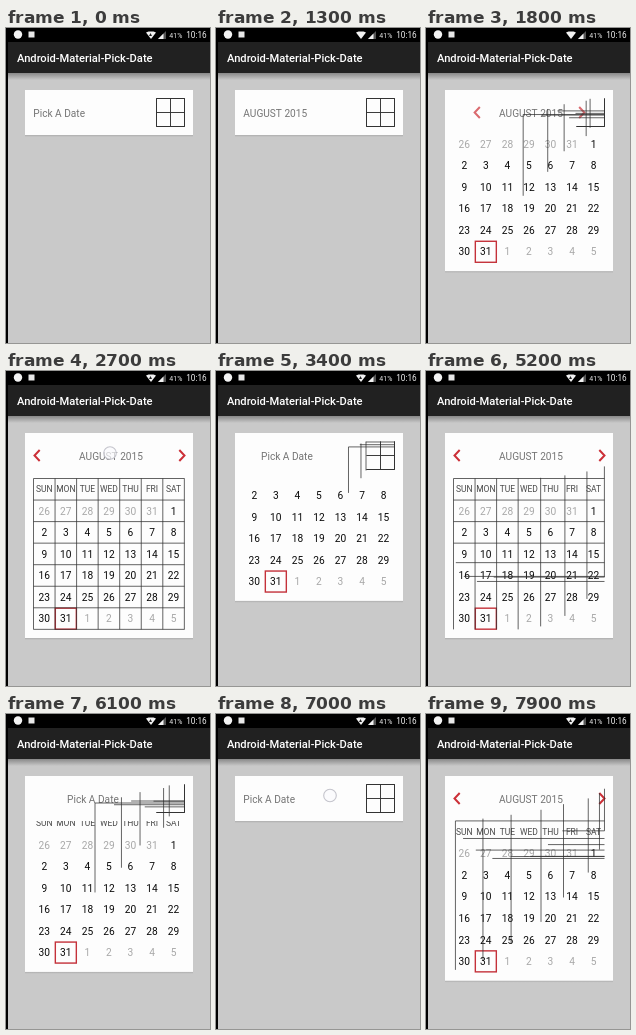
An HTML page with a canvas for the animation above (8000 ms loop, 204 by 315 pixels).

```html
<!DOCTYPE html>
<html lang="en">
<head>
<meta charset="utf-8">
<title>Date picker</title>
<style>
html, body { margin: 0; width: 100%; height: 100%; overflow: hidden; background: #c9c9c9; }
canvas { display: block; width: 204px; height: 315px; }
</style>
</head>
<body>
<canvas id="stage"></canvas>
<script>
const canvas = document.getElementById('stage');
const ctx = canvas.getContext('2d');
const dpr = window.devicePixelRatio || 1;
canvas.width = 204 * dpr;
canvas.height = 315 * dpr;

const LOOP = 8000;
const CARD = { x: 19, y: 62, w: 168, closed: 107, open: 267 };
const GRID = { x: 27.5, y: 107.5, cell: 21.55, right: 178.5, bottom: 258.4 };
const ICON_X = [150.5, 164.5, 178.5];
const ICON_Y = [70.5, 84.5, 98.5];
const START = [0, 0, 0, 1, 1, 2, 2, 2];
const LINE_MS = 400;
const WEEKDAYS = ['SUN', 'MON', 'TUE', 'WED', 'THU', 'FRI', 'SAT'];

// at: title swaps; base: first grid line starts moving
const PHASES = [
  { at: 0, open: false, base: -5000 },
  { at: 1100, open: true, base: 1618 },
  { at: 2720, open: false, base: 2821 },
  { at: 4200, open: true, base: 4676 },
  { at: 5520, open: false, base: 5621 },
  { at: 7100, open: true, base: 7533 }
];
const TOUCHES = [
  { from: 1000, to: 1300, x: 103, y: 84 },
  { from: 2700, to: 2950, x: 104, y: 82 },
  { from: 4000, to: 4390, x: 104, y: 80 },
  { from: 5500, to: 5750, x: 108, y: 81 },
  { from: 7000, to: 7250, x: 114, y: 81.5 }
];

const clamp = v => Math.min(1, Math.max(0, v));
const lerp = (a, b, p) => a + (b - a) * p;
const smooth = v => 0.5 - 0.5 * Math.cos(Math.PI * clamp(v));

// cubic-bezier(.4, 0, .2, 1)
function swift(v) {
  v = clamp(v);
  let lo = 0, hi = 1;
  for (let i = 0; i < 20; i++) {
    const s = (lo + hi) / 2, r = 1 - s;
    if (1.2 * r * r * s + 0.6 * r * s * s + s * s * s < v) lo = s; else hi = s;
  }
  return lo * lo * (3 - 2 * lo);
}

function rect(x, y, w, h, fill) {
  ctx.fillStyle = fill;
  ctx.fillRect(x, y, w, h);
}

function poly(points, fill) {
  ctx.beginPath();
  points.forEach(([x, y]) => ctx.lineTo(x, y));
  ctx.closePath();
  ctx.fillStyle = fill;
  ctx.fill();
}

function text(str, x, y, size, color, align = 'left', weight = 400) {
  ctx.font = `${weight} ${size}px Roboto, sans-serif`;
  ctx.textAlign = align;
  ctx.fillStyle = color;
  ctx.fillText(str, x, y);
}

function fade(y, h, from, to) {
  const g = ctx.createLinearGradient(0, y, 0, y + h);
  g.addColorStop(0, from);
  g.addColorStop(1, to);
  return g;
}

function stateAt(t) {
  const { open, base } = PHASES.filter(p => p.at <= t).pop();
  const dt = t - base;
  if (open) {
    return {
      title: 'AUGUST 2015',
      card: swift((dt + 102) / 500),
      slide: smooth((dt + 300) / 400),
      arrow: smooth((dt - 70) / 250),
      grid: i => smooth(dt / LINE_MS - 0.1 * i)
    };
  }
  return {
    title: 'Pick A Date',
    card: 1 - smooth((dt - 388) / 600),
    slide: 1 - smooth((dt - 279) / 500),
    arrow: 1 - smooth((dt + 100) / 250),
    grid: i => 1 - smooth(dt / LINE_MS - 0.1 * (7 - i))
  };
}

function drawBars(t) {
  rect(0, 0, 204, 315, '#c9c9c9');
  rect(0, 45, 204, 7, fade(45, 7, 'rgba(0,0,0,.32)', 'rgba(0,0,0,0)'));
  rect(0, 14, 204, 31, '#212121');
  rect(0, 0, 204, 14, '#000');
  rect(0, 0, 2, 315, '#000');

  ctx.beginPath();
  ctx.arc(12, 6.5, 4.2, 0, 7);
  ctx.fillStyle = '#f4f4f4';
  ctx.fill();
  rect(22.5, 3.5, 6, 6, '#e8e8e8');

  poly([[140, 4.6], [142.5, 3.4], [147.5, 3.4], [150, 4.6], [145, 11]], '#f2f2f2');
  const transfer = t < 400 || t >= 2300;
  if (transfer) poly([[143, 8], [146, 8], [144.5, 5]], '#222');
  poly([[152, 11], [160, 11], [160, 3]], '#555');
  poly([[152, 11], [157.5, 11], [157.5, 5.5]], '#f2f2f2');
  text('41%', 163.3, 9.8, 7, '#e8e8e8');
  text('10:16', 180.2, 10.2, 8.2, '#f2f2f2');
  text('Android-Material-Pick-Date', 11, 33.5, 11.15, '#fff', 'left', 500);
}

function drawCalendar(bottom) {
  const { x, y, w, closed, open } = CARD;
  const shift = bottom - open;
  rect(x, bottom, w, 2, fade(bottom, 2, 'rgba(0,0,0,.14)', 'rgba(0,0,0,0)'));
  rect(x, y, w, bottom - y, '#fdfdfd');

  ctx.save();
  ctx.beginPath();
  ctx.rect(x, closed, w, bottom - closed);
  ctx.clip();
  const colX = c => GRID.x + GRID.cell * (c + 0.5);
  const rowY = r => GRID.y + GRID.cell * (r + 0.5) + shift;
  WEEKDAYS.forEach((d, c) => text(d, colX(c), rowY(0) + 3, 8.5, '#484848', 'center'));
  for (let i = 0; i < 42; i++) {
    const before = i < 6, after = i > 36;
    const day = before ? 26 + i : after ? i - 36 : i - 5;
    text(day, colX(i % 7), rowY(1 + Math.floor(i / 7)) + 3.8, 10.2,
      before || after ? '#a8a8a8' : '#0a0a0a', 'center');
  }
  ctx.strokeStyle = '#c4313a';
  ctx.lineWidth = 1.4;
  ctx.strokeRect(colX(1) - 10.5, rowY(6) - 10.4, 21, 21);
  ctx.restore();
}

function drawHeader(s) {
  ctx.font = '400 10.15px Roboto, sans-serif';
  const centered = 105 - ctx.measureText(s.title).width / 2;
  text(s.title, lerp(27.3, centered, s.slide), 88.6, 10.15, '#757575');

  ctx.save();
  ctx.globalAlpha = clamp(s.arrow * 1.7);
  ctx.strokeStyle = '#cc3038';
  ctx.lineWidth = 2;
  for (const dir of [-1, 1]) {
    const tip = 103.5 + dir * (75 - 35 * (1 - s.arrow));
    ctx.beginPath();
    ctx.moveTo(tip - dir * 5.2, 79);
    ctx.lineTo(tip, 84.5);
    ctx.lineTo(tip - dir * 5.2, 90);
    ctx.stroke();
  }
  ctx.restore();
}

// One path, so lines resting on each other do not darken
function drawLines(s) {
  ctx.beginPath();
  for (let i = 0; i < 8; i++) {
    const p = s.grid(i);
    const x = lerp(ICON_X[START[i]], GRID.x + GRID.cell * i, p);
    const y = lerp(ICON_Y[START[i]], GRID.y + GRID.cell * i, p);
    ctx.moveTo(x, lerp(ICON_Y[0], GRID.y, p));
    ctx.lineTo(x, lerp(ICON_Y[2], GRID.bottom, p));
    ctx.moveTo(lerp(ICON_X[0], GRID.x, p), y);
    ctx.lineTo(lerp(ICON_X[2], GRID.right, p), y);
  }
  ctx.strokeStyle = '#303030';
  ctx.lineWidth = 0.75;
  ctx.stroke();
}

function drawTouch(t) {
  const touch = TOUCHES.find(p => t >= p.from && t < p.to);
  if (!touch) return;
  ctx.beginPath();
  ctx.arc(touch.x, touch.y, 6.3, 0, 7);
  ctx.fillStyle = 'rgba(250,250,252,.7)';
  ctx.fill();
  ctx.strokeStyle = '#c4c4cc';
  ctx.lineWidth = 1.1;
  ctx.stroke();
}

function draw(now) {
  const t = now % LOOP;
  const s = stateAt(t);
  ctx.setTransform(dpr, 0, 0, dpr, 0, 0);
  drawBars(t);
  drawCalendar(lerp(CARD.closed, CARD.open, s.card));
  drawHeader(s);
  drawLines(s);
  drawTouch(t);
}

const began = performance.now();
function tick() {
  draw(performance.now() - began);
  requestAnimationFrame(tick);
}
tick();
</script>
</body>
</html>
```
